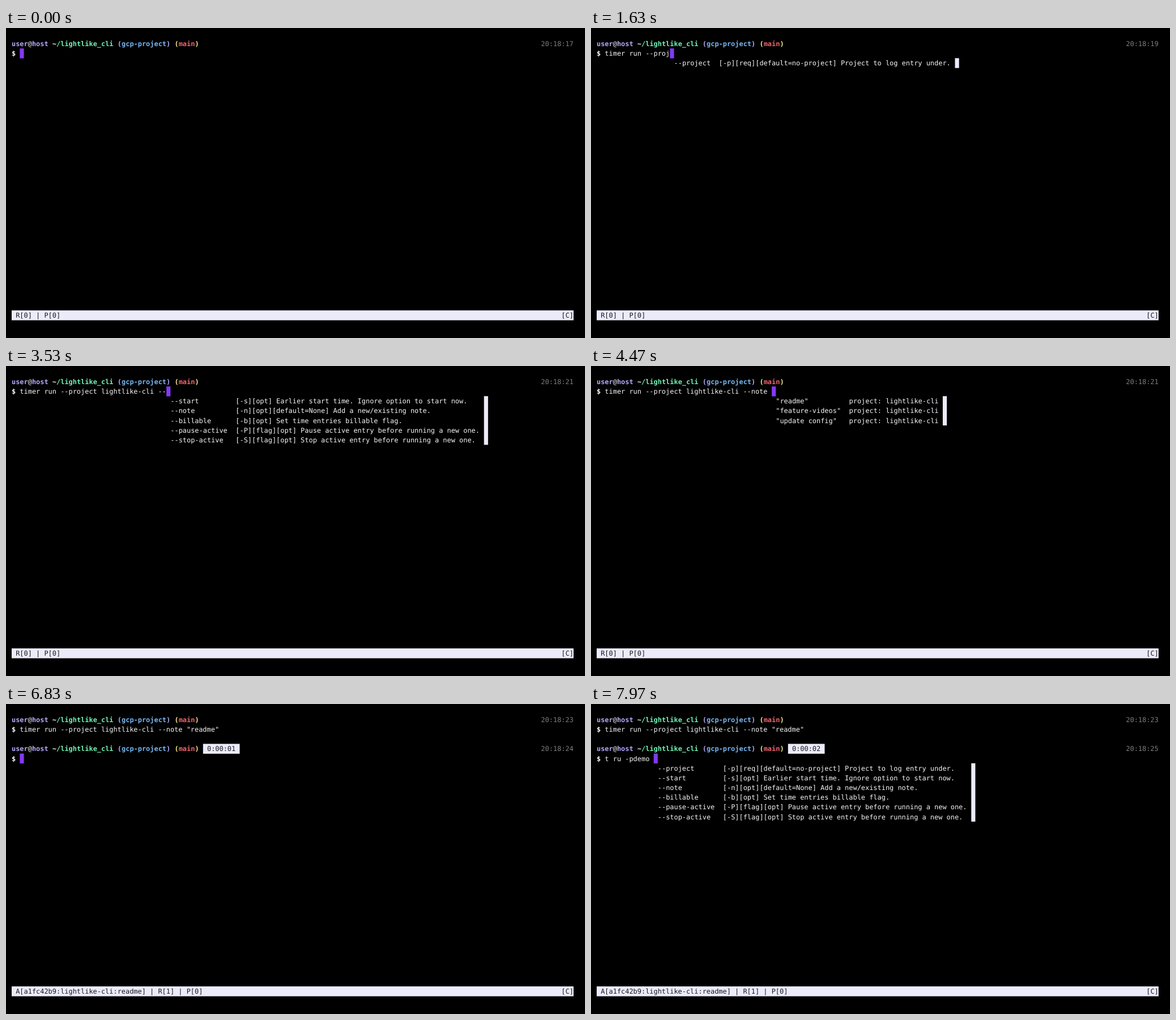
Recreate the animation shown at these times as an HTML page. Size 1022 px wide and 548 px high, loop 8 s.

```html
<!DOCTYPE html>
<html lang="en">
<head>
<meta charset="utf-8">
<title>Terminal session</title>
<style>
html, body { margin: 0; width: 100%; height: 100%; overflow: hidden; background: #000; }
#term {
  position: absolute; left: 0; top: 0; width: 1022px; height: 548px;
  font: 11.938px "DejaVu Sans Mono", "Noto Sans Mono", monospace;
  fill: #f6f6f8; text-rendering: geometricPrecision;
  font-kerning: none; font-variant-ligatures: none;
}
text { white-space: pre; }
.b { font-weight: 700; }
.lav { fill: #b5a8f8; }
.mint { fill: #70f5b5; }
.blue { fill: #76b9f5; }
.yel { fill: #f3ef8c; }
.red { fill: #f2626e; }
.dim { fill: #7e7e7e; }
.ink { fill: #17171c; }
.bar { fill: #ebebfa; }
.cur { fill: #8239f6; }
</style>
</head>
<body>
<svg id="term" viewBox="0 0 1022 548"></svg>
<script>
const LOOP = 8000, CW = 7.187, RH = 17.15, X0 = 10, Y0 = 19;
const BASE = 13, COLS = 138, STATUS_ROW = 28;
const ENTER = 5230, NEXT = 5530;
const term = document.getElementById('term');

// [start, ms per key, text]
const FIRST = [
  [30, 110, 'timer run '],
  [1270, 69, '--project lightlike-cli '],
  [3330, 105, '--note '],
  [4530, 42, '"readme"']
];
const SECOND = [[6900, 94, 't ru -pdemo ']];

// Times at which the clock moves on by one second
const TICKS = [60, 1130, 2250, 3330, 4530, 5230, 6330, 7430];

const OPTIONS = [
  ['--project', '[-p][req][default=no-project] Project to log entry under.'],
  ['--start', '[-s][opt] Earlier start time. Ignore option to start now.'],
  ['--note', '[-n][opt][default=None] Add a new/existing note.'],
  ['--billable', '[-b][opt] Set time entries billable flag.'],
  ['--pause-active', '[-P][flag][opt] Pause active entry before running a new one.'],
  ['--stop-active', '[-S][flag][opt] Stop active entry before running a new one.']
];
const NOTES = ['"readme"', '"feature-videos"', '"update config"']
  .map(note => [note, 'project: lightlike-cli']);

const PROMPT = [
  ['user', 'b lav'], ['@', ''], ['host', 'b lav'], [' ~', 'b'],
  ['/lightlike_cli', 'b mint'], [' (', 'b lav'], ['gcp-project', 'b blue'],
  [')', 'b lav'], [' (', 'b yel'], ['main', 'b red'], [')', 'b yel']
];

function typed(runs, t) {
  return runs.map(([start, step, text]) =>
    text.slice(0, Math.max(0, Math.floor((t - start) / step) + 1))).join('');
}

const px = n => n.toFixed(2);

function label(col, row, text, cls = '') {
  return `<text x="${px(X0 + col * CW)}" y="${px(Y0 + row * RH + BASE)}" class="${cls}">${text}</text>`;
}

// Blocks reach slightly below their cells so stacked rows close up
function block(col, row, cls, cols = 1, rows = 1) {
  return `<rect x="${px(X0 + col * CW)}" y="${px(Y0 + row * RH)}" ` +
    `width="${px(cols * CW)}" height="${px(rows * RH + 0.3)}" class="${cls}"/>`;
}

function prompt(row, clock, input) {
  let col = 0, out = '';
  for (const [text, cls] of PROMPT) {
    out += label(col, row, text, cls);
    col += text.length;
  }
  return out + label(COLS - 8, row, '20:18:' + clock, 'dim') +
    label(0, row + 1, '$', 'b') + label(2, row + 1, input);
}

function choices(input) {
  const m = input.match(/^(?:timer run|t ru) (.*)$/);
  if (!m) return [];
  const args = m[1], note = args.match(/--note (.*)$/);
  if (note) return NOTES.filter(n => n[0].startsWith(note[1]));
  if (/--project [^ ]*$/.test(args)) return [];
  const word = args.split(' ').pop();
  return OPTIONS.filter(([name]) =>
    name.startsWith(word) && !args.includes(name + ' '));
}

function menu(col, row, items) {
  if (!items.length) return '';
  const gap = Math.max(...items.map(i => i[0].length)) + 2;
  const width = gap + Math.max(...items.map(i => i[1].length)) + 1;
  return items.map(([name, info], i) =>
    label(col, row + i, name) + label(col + gap, row + i, info)).join('') +
    block(col + width, row, 'bar', 1, items.length);
}

function editor(row, clock, input) {
  const col = 2 + input.length;
  return prompt(row, clock, input) + block(col, row + 1, 'cur') +
    menu(col + 1, row + 2, choices(input));
}

function status(text) {
  return block(0, STATUS_ROW, 'bar', COLS) + label(1, STATUS_ROW, text, 'ink') +
    label(COLS - 3, STATUS_ROW, '[C]', 'ink');
}

function screen(t) {
  const clock = 17 + TICKS.filter(x => t >= x).length;
  const first = typed(FIRST, t);
  if (t < ENTER) return editor(0, clock, first) + status('R[0] | P[0]');
  let out = prompt(0, 23, first);
  if (t >= NEXT) {
    out += editor(3, clock, typed(SECOND, t)) +
      block(47, 3, 'bar', 9) + label(48, 3, `0:00:0${clock - 23}`, 'ink') +
      status('A[a1fc42b9:lightlike-cli:readme] | R[1] | P[0]');
  }
  return out;
}

let shown = '';
const began = performance.now();
function draw() {
  const next = screen((performance.now() - began) % LOOP);
  if (next !== shown) term.innerHTML = shown = next;
  requestAnimationFrame(draw);
}
draw();
</script>
</body>
</html>
```
